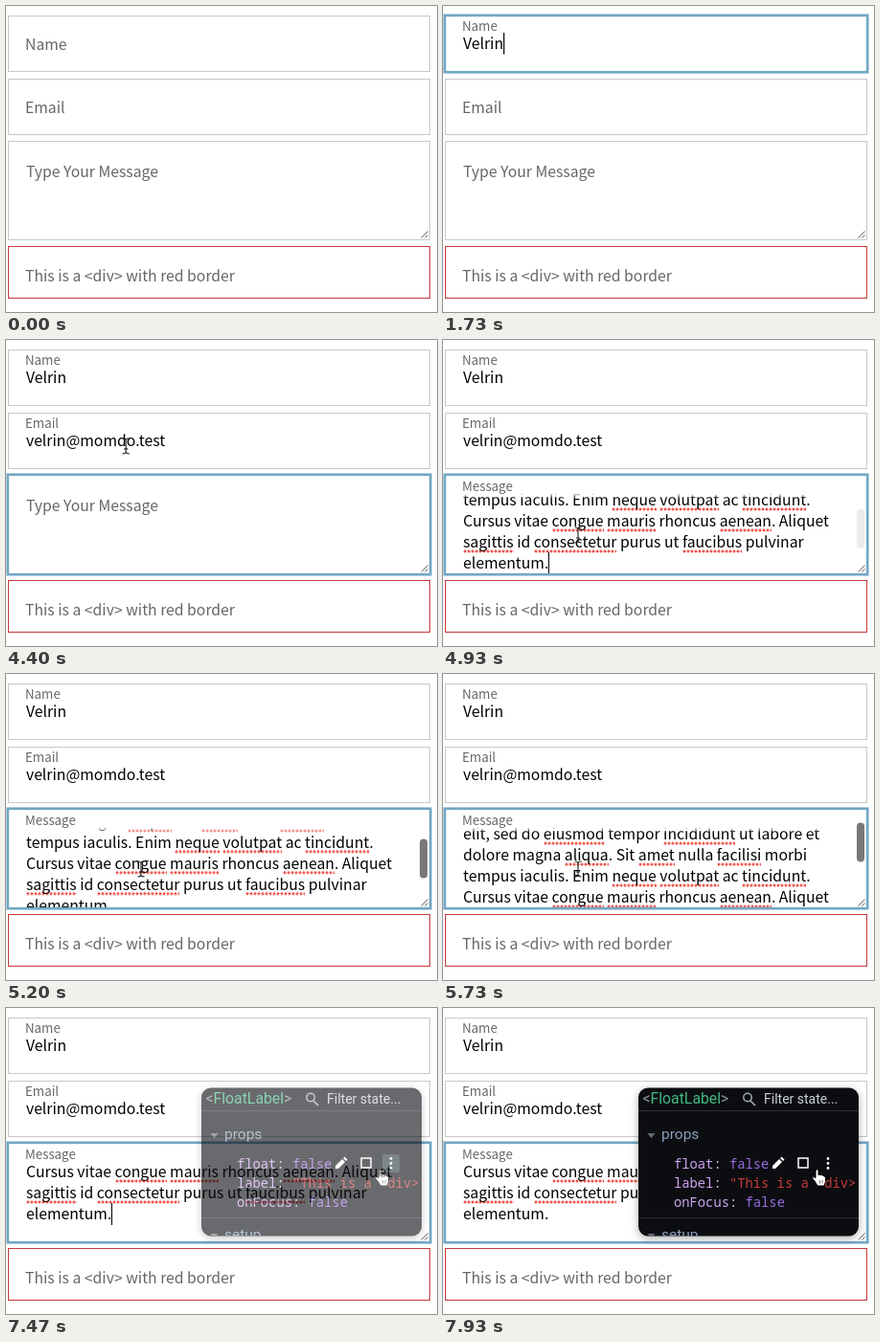
Recreate the animation shown at these times as an HTML page. Size 450 px wide and 320 px high, loop 8 s.

```html
<!DOCTYPE html>
<html lang="en">
<head>
<meta charset="utf-8">
<title>Floating labels</title>
<style>
  html, body { margin: 0; width: 100%; height: 100%; overflow: hidden; background: #fff; }
  body { position: relative; font: 15.75px/22px "Noto Sans CJK SC", "Noto Sans CJK JP", sans-serif; color: #000; }
  svg { position: absolute; left: 0; top: 0; }
  #message { position: absolute; left: 4px; top: 143px; width: 437px; height: 101px; overflow: hidden; }
  #message p { position: absolute; left: 17px; top: 19px; margin: 0; white-space: pre; }
  #message u {
    text-decoration: none; padding-bottom: .5px;
    background: radial-gradient(circle, #f0524a 1.2px, transparent 1.8px) 0 100% / 4px 4px repeat-x;
  }
  #message i { position: absolute; width: 1px; height: 23px; background: #000; }
  .hint { fill: #666; }
  .box { fill: none; stroke: #c8c8c8; }
  #panel { filter: drop-shadow(0 2px 4px #0005); }
  .ui { font-family: Roboto, sans-serif; }
  .code { font: 13.8px "Noto Sans Mono", monospace; white-space: pre; }
  .key { fill: #cfa6f2; }
  .value { fill: #9b6ce2; }
</style>
</head>
<body>
<div id="message"><p>Lorem ipsum dolor sit <u>amet</u>, <u>consectetur</u> <u>adipiscing</u>
elit, sed do <u>eiusmod</u> tempor <u>incididunt</u> ut labore et
dolore magna <u>aliqua</u>. Sit <u>amet</u> nulla <u>facilisi</u> morbi
tempus iaculis. Enim <u>neque</u> <u>volutpat</u> ac <u>tincidunt</u>.
Cursus vitae <u>congue</u> <u>mauris</u> rhoncus <u>aenean</u>. Aliquet
<u>sagittis</u> id <u>consectetur</u> purus ut <u>faucibus</u> pulvinar
elementum.<i></i></p></div>

<svg width="450" height="320" viewBox="0 0 450 320">
  <defs>
    <linearGradient id="fade" x2="0" y2="1">
      <stop offset=".74" stop-color="#fff"/>
      <stop offset="1" stop-color="#fff" stop-opacity="0"/>
    </linearGradient>
    <clipPath id="rounded"><rect x="204" y="83.500" width="230" height="155" rx="10"/></clipPath>
  </defs>

  <rect x="4" y="143" width="427" height="23" fill="url(#fade)"/>
  <rect class="box" x="2.5" y="10.5" width="440" height="58"/>
  <rect class="box" x="2.5" y="76.5" width="440" height="58"/>
  <rect class="box" x="2.5" y="141.5" width="440" height="103"/>
  <rect class="box" x="2.5" y="251.5" width="440" height="54" style="stroke:#c8373a"/>
  <path d="M433.500 242.500l7-7M437.500 242.500l3-3" stroke="#666"/>
  <rect id="ring" x="1.8" width="441.4" fill="none" stroke="#72a6c4" stroke-width="2.7"/>

  <text class="hint" x="20" y="288">This is a &lt;div&gt; with red border</text>
  <text class="hint" x="21" y="179" id="placeholder">Type Your Message</text>
  <text class="hint" id="nameLabel">Name</text>
  <text class="hint" id="emailLabel">Email</text>
  <text class="hint" id="messageLabel">Message</text>
  <text x="21" y="45" id="nameValue"></text>
  <text x="21" y="111" id="emailValue"></text>
  <rect id="caret" width="1.2" height="22.5"/>
  <rect id="thumb" x="432" width="8" height="41" rx="4" fill="#777"/>
  <path id="pointer" d="M-3.5-8Q-.5-8 0-6.5Q.5-8 3.5-8M0-6.5V6.5M-3.5 8Q-.5 8 0 6.5Q.5 8 3.5 8M-2 3H2" fill="none" stroke="#222" stroke-width="1.1"/>

  <g id="panel">
    <g clip-path="url(#rounded)">
      <rect x="204" y="83" width="230" height="156" fill="#0c0d11"/>
      <path d="M204 107.5h230M204 219.5h230" stroke="#2b3038"/>
      <g class="ui">
        <text x="208.500" y="100" font-size="15.800" fill="#8b949e">&lt;<tspan fill="#42b983">FloatLabel</tspan>&gt;</text>
        <text x="335" y="99.500" font-size="14" fill="#cdd1d6">Filter state...</text>
        <text x="228" y="137" font-size="15.500" fill="#8aa1bd">props</text>
        <text x="228" y="242" font-size="15.500" fill="#8aa1bd">setup</text>
      </g>
      <path d="M321 97l5 5" stroke="#a5abb3" stroke-width="1.700"/>
      <circle cx="318" cy="93.500" r="4.200" fill="none" stroke="#a5abb3" stroke-width="1.500"/>
      <path d="M213.500 131h8l-4 5zM213.500 236h8l-4 5z" fill="#666d76"/>
      <g class="code">
        <text x="241" y="167.500" fill="#ddd"><tspan class="key">float</tspan>: <tspan class="value">false</tspan></text>
        <text x="241" y="188" fill="#ddd"><tspan class="key">label</tspan>: <tspan fill="#c63a3a">"This is a &lt;div&gt;</tspan></text>
        <text x="241" y="208" fill="#ddd"><tspan class="key">onFocus</tspan>: <tspan class="value">false</tspan></text>
      </g>
      <rect id="hover" x="393" y="153" width="18" height="19" rx="2" fill="#2c3b42"/>
      <path d="M344 168v-3l7-7 3 3-7 7zM352 157l1.500-1.500 3 3-1.500 1.500z" fill="#fff"/>
      <rect x="371" y="157" width="10" height="10" fill="none" stroke="#fff" stroke-width="1.500"/>
      <path d="M402 157.500h0M402 162.500h0M402 167.500h0" stroke="#fff" stroke-width="2.800" stroke-linecap="round"/>
      <path d="M388 181l-2.500-3q1-2.500 3.500-.5V170q1.500-2.500 3 0v4.500q6-.5 7.500 3v4l-1.500 4.500h-7z" fill="#fff" stroke="#000"/>
      <path d="M393.500 180v3.500M396 180v3.500" stroke="#555" stroke-width=".8"/>
    </g>
  </g>
</svg>

<script>
const LOOP = 8000, BLINK = 465, PASTE = 4600;
const NAME = 'Velrin', EMAIL = 'velrin@momdo.test';
const $ = id => document.getElementById(id);
const body = document.querySelector('#message p');
const bodyCaret = document.querySelector('#message i');
const clamp = v => Math.min(1, Math.max(0, v));
const easeOut = v => 1 - (1 - v) ** 2;
const show = (el, on) => { el.style.visibility = on ? 'visible' : 'hidden'; };

// Linear interpolation through [time, value] points.
function track(t, points) {
  let [t0, v0] = points[0];
  for (const [t1, v1] of points) {
    if (t < t1) return t1 > t0 ? v0 + (v1 - v0) * clamp((t - t0) / (t1 - t0)) : v0;
    [t0, v0] = [t1, v1];
  }
  return v0;
}

const typed = (t, start, interval, max) =>
  Math.max(0, Math.min(max, Math.floor((t - start) / interval) + 1));

function floatLabel(id, t, start, restY, topY) {
  const k = easeOut(clamp((t - start) / 200));
  $(id).setAttribute('transform',
    `translate(20 ${restY + (topY - restY) * k}) scale(${1 - 0.155 * k})`);
  return k;
}

const fields = [
  { from: 470, top: 10.5, height: 58, baseline: 45, value: $('nameValue') },
  { from: 1870, top: 76.5, height: 58, baseline: 111, value: $('emailValue') },
  { from: 3670, top: 141.5, height: 103, baseline: 179 },
];
const RING_GAP = 0.7;
const caretResets = [470, 1400, 1730, 1870, 2400, 2730, 2870, 3200, 3470, 3730, PASTE];

function drawFields(t) {
  $('nameValue').textContent = NAME.slice(0, typed(t, 1400, 66, 6));
  $('emailValue').textContent =
    EMAIL.slice(0, typed(t, 2400, 66, 6) + typed(t, 2870, 60, 11));
  floatLabel('nameLabel', t, 1400, 46, 26);
  floatLabel('emailLabel', t, 2400, 112, 92);
  $('messageLabel').style.opacity = floatLabel('messageLabel', t, PASTE, 179, 158);

  const focused = fields.filter(f => f.from <= t).pop();
  const reset = caretResets.filter(r => r <= t).pop();
  const caretOn = !!focused && (t - reset) % (2 * BLINK) < BLINK;
  show($('ring'), focused);
  show($('caret'), caretOn && t < PASTE);
  show(bodyCaret, caretOn && t >= PASTE);
  if (focused) {
    $('ring').setAttribute('y', focused.top - RING_GAP);
    $('ring').setAttribute('height', focused.height + 2 * RING_GAP);
    const width = focused.value ? focused.value.getComputedTextLength() : 0;
    $('caret').setAttribute('x', 21 + width);
    $('caret').setAttribute('y', focused.baseline - 17);
  }
}

function drawMessage(t) {
  const scroll = track(t, [[5070, 72], [5730, 28], [5960, 0], [6130, 0], [6700, 90]]);
  show(body, t >= PASTE);
  show($('placeholder'), t < PASTE);
  body.style.transform = `translateY(${-scroll}px)`;
  $('thumb').setAttribute('y', 142.3 + 0.477 * scroll);
  $('thumb').style.opacity = track(t,
    [[4740, 0], [4870, 0.15], [5070, 0.15], [5200, 1], [6800, 1], [7050, 0]]);
}

function drawPointer(t) {
  const entering = t < 1400;
  const k = easeOut(clamp(entering ? (t - 50) / 280 : (t - 4250) / 550));
  const [x0, y0, x1, y1] = entering ? [126, -6, 111, 27] : [111, 27, 141, 204];
  $('pointer').setAttribute('transform',
    `translate(${x0 + (x1 - x0) * k} ${y0 + (y1 - y0) * k})`);
  show($('pointer'), (t >= 70 && entering) || (t >= 4270 && t < 6870));
}

function frame() {
  const t = performance.now() % LOOP;
  drawFields(t);
  drawMessage(t);
  drawPointer(t);
  $('panel').style.opacity = clamp((t - 7165) / 500);
  $('hover').style.opacity = track(t, [[7670, 1], [7870, 0]]);
  requestAnimationFrame(frame);
}
frame();
</script>
</body>
</html>
```
